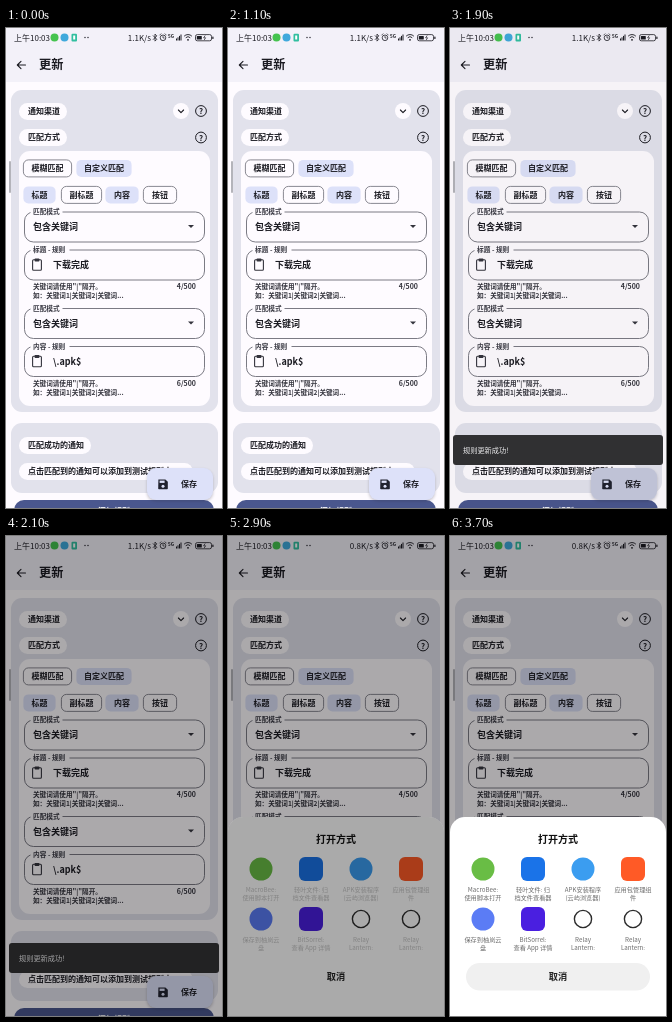
Recreate the animation shown at these times as an HTML page. Size 216x480 px, loop 3800 ms.

```html
<!DOCTYPE html>
<html lang="zh-CN">
<head>
<meta charset="utf-8">
<title>更新</title>
<style>
  html, body { margin: 0; width: 100%; height: 100%; overflow: hidden; background: #fefbff; }
  svg { display: block; width: 100vw; height: 100vh; }
  text { font-family: 'Noto Sans CJK SC', 'Noto Sans CJK', 'Noto Sans', sans-serif; white-space: pre; }
  #snack { transform-box: fill-box; transform-origin: center; }
</style>
</head>
<body>
<svg id="stage" viewBox="0 0 216 480" preserveAspectRatio="none"></svg>
<script>
const INK = '#1b1b22', PAPER = '#fefbff', CARD = '#e2e2ec', TINT = '#dde1f9';
const LOOP = 3800, DIM = 0.33;

const box = (x, y, w, h, r, fill, more = '') =>
  `<rect x="${x}" y="${y}" width="${w}" height="${h}" rx="${r}" fill="${fill}" ${more}/>`;
const dot = (x, y, r, fill, more = '') =>
  `<circle cx="${x}" cy="${y}" r="${r}" fill="${fill}" ${more}/>`;
const line = (d, w = 1, color = INK) =>
  `<path d="${d}" fill="none" stroke="${color}" stroke-width="${w}" stroke-linecap="round" stroke-linejoin="round"/>`;
const label = (x, y, size, str, { fill = INK, weight = 700, anchor = 'start', more = '' } = {}) =>
  `<text x="${x}" y="${y}" font-size="${size}" font-weight="${weight}" fill="${fill}" text-anchor="${anchor}" ${more}>${str}</text>`;
const group = (id, body, more = '') => `<g id="${id}" ${more}>${body}</g>`;

const pill = (y, w, str) => box(13, y, w, 17, 8.5, PAPER) + label(22, y + 11.4, 8, str);

const help = y =>
  dot(195, y, 5.4, 'none', `stroke="${INK}" stroke-width="1"`) +
  label(195, y + 3, 8, '?', { anchor: 'middle' });

function chip(x, y, w, str, on) {
  const border = on ? '' : 'stroke="#6c6c76" stroke-width=".8"';
  return box(x + .4, y + .4, w - .8, 17, 5, on ? TINT : PAPER, border) +
    label(x + w / 2, y + 11.8, 8, str, { anchor: 'middle' });
}

function field(y, name, value, clip) {
  const w = clip ? 39 : 32;
  let s = box(18.5, y + .5, 180, 30, 9, 'none', 'stroke="#6c6c76" stroke-width=".9"') +
    box(24.5, y - 3, w, 7, 0, PAPER) +
    label(27, y + 2.8, 6.7, name, { fill: '#3c3c46' }) +
    label(clip ? 47 : 27, y + 18.6, 9, value);
  if (clip) {
    s += box(26.6, y + 10.2, 8.8, 10.6, 1, 'none', 'stroke="#34343d" stroke-width="1.1"') +
      box(28.6, y + 9, 4.8, 3, .7, '#34343d');
  } else {
    s += `<path d="M182 ${y + 13.6}h6l-3 3z" fill="#34343d"/>`;
  }
  return s;
}

const hint = (y, count) => {
  const gray = { fill: '#33333c' };
  return label(27, y, 6.6, '关键词请使用"|"隔开。', gray) +
    label(27, y + 9, 6.6, '如：关键词1|关键词2|关键词...', gray) +
    label(190, y, 7, count, { ...gray, anchor: 'end' });
};

const statusBar = () => {
  const wave = r => `M${182 - r} ${11.5 - r}a${r * 1.4} ${r * 1.4} 0 0 1 ${2 * r} 0`;
  const bars = [2, 3.2, 4.6, 6].map((h, i) => box(170 + i * 1.5, 12.5 - h, 1, h, 0, INK)).join('');
  return label(8, 12.6, 8, '上午10:03', { weight: 500 }) +
    dot(48.5, 9.5, 4, '#45c34f') + dot(58.5, 9.5, 4, '#3fa9dc') +
    box(65.5, 5.8, 5.5, 7.6, 1, '#32bfa0') + box(67.2, 7.5, 2, 4, 0, '#fff') +
    dot(79, 9.5, .7, INK) + dot(82, 9.5, .7, INK) +
    group('fast', label(145, 12.6, 8, '1.1K/s', { weight: 500, anchor: 'end' })) +
    group('slow', label(145, 12.6, 8, '0.8K/s', { weight: 500, anchor: 'end' })) +
    line('M147.2 7.7l3.6 3.6-1.8 1.8v-7l1.8 1.8-3.6 3.6', .8) +
    dot(157, 9.8, 2.8, 'none', `stroke="${INK}" stroke-width=".8"`) +
    line('M157 8.3v1.7h1.2M153.8 7l1.2-1.2M160.2 7l-1.2-1.2', .7) +
    label(162, 9.8, 4.6, '5G') + bars +
    line(wave(3.6), .9) + line(wave(2), .9) + dot(182, 11.8, .9, INK) +
    box(189.5, 6.6, 16, 6.2, 1.8, 'none', `stroke="${INK}" stroke-width=".8"`) +
    box(190.8, 7.9, 5, 3.6, .6, INK) +
    box(206.3, 8.5, 1.2, 2.4, .5, INK) + line('M199 7.8l-1.4 2h2l-1.2 1.9', .7);
};

const page = () =>
  box(0, 0, 216, 480, 0, PAPER) + box(0, 0, 216, 54, 0, '#f3f1f9') + statusBar() +
  line('M19.5 37h-8M15 33.3l-3.7 3.7 3.7 3.7', 1.1) + label(33, 41.3, 12.2, '更新') +
  box(5, 62, 207, 322, 11, CARD) +
  pill(75, 48, '通知渠道') + dot(175, 83, 8, PAPER) + line('M172.4 82l2.6 2.6 2.6-2.6', 1.1) + help(83) +
  pill(101, 48, '匹配方式') + help(109.5) +
  box(13, 123, 191, 255, 11, PAPER) +
  chip(17, 131.5, 49, '模糊匹配') + chip(70, 131.5, 56, '自定义匹配', true) +
  chip(17, 158, 33, '标题', true) + chip(55, 158, 41, '副标题') +
  chip(99, 158, 34, '内容', true) + chip(137, 158, 34, '按钮') +
  field(183.5, '匹配模式', '包含关键词') +
  field(221.5, '标题 - 规则', '下载完成', true) + hint(261, '4/500') +
  field(280, '匹配模式', '包含关键词') +
  field(318, '内容 - 规则', '\\.apk$', true) + hint(358, '6/500') +
  box(3, 133, 2, 32, 1, '#b4b4ba') +
  box(5, 395, 207, 70, 11, CARD) +
  pill(409, 72, '匹配成功的通知') + pill(435, 174, '点击匹配到的通知可以添加到测试规则中') +
  box(8, 472, 200, 30, 10, '#4a578e') + label(108, 486, 8, '添加规则', { fill: '#fff', anchor: 'middle' });

const saveButton = () =>
  box(141, 441.5, 66, 32, 9, '#34344a', 'opacity=".28" filter="url(#soft)"') +
  box(141, 440, 66, 32, 9, TINT) +
  `<g clip-path="url(#fab)">${dot(174, 456, 36, '#55555c', 'id="ripple"')}</g>` +
  '<path d="M152.4 451.4h7l2.4 2.4v6.6q0 .8-.8.8h-8q-.8 0-.8-.8z" fill="#20222f"/>' +
  box(153.6, 452.6, 5, 2.3, 0, TINT) + dot(157, 458.2, 1.5, TINT) +
  label(175, 459, 8, '保存');

const snackbar = () =>
  box(3, 407, 210, 30, 3, '#323234') + label(13, 424.6, 7.2, '规则更新成功!', { fill: '#f4f4f6', weight: 500 });

const apps = [
  ['#69bd45', 'dot', 'MacroBee:', '使用脚本打开'],
  ['#1a73e8', 'box', '轻叶文件: 归', '档文件查看器'],
  ['#3b9df0', 'dot', 'APK安装程序', '(云屿浏览器)'],
  ['#ff5a26', 'box', '应用包管理组', '件'],
  ['#5b7cf5', 'dot', '保存到柚岚云', '盘'],
  ['#4a1fe0', 'box', 'BitSorrel:', '查看 App 详情'],
  ['', 'ring', 'Relay', 'Lantern:'],
  ['', 'ring', 'Relay', 'Lantern:']
];

function appIcon([color, kind], i) {
  const x = 33 + i % 4 * 50, y = i < 4 ? 333 : 383;
  if (kind === 'box') return box(x - 12, y - 12, 24, 24, 6, color);
  if (kind === 'dot') return dot(x, y, 11.5, color);
  return dot(x, y, 8.6, '#fff', 'stroke="#2c2c2c" stroke-width="1.4"');
}

function appName([, , top, low], i) {
  const x = 33 + i % 4 * 50, y = i < 4 ? 356 : 406;
  const style = { anchor: 'middle', weight: 400, fill: '#6a6a6a' };
  return label(x, y, 6.2, top, style) + label(x, y + 7.6, 6.2, low, style);
}

const sheet = () =>
  box(0, 281, 216, 220, 15, '#fff') +
  label(108, 306.6, 10, '打开方式', { anchor: 'middle', fill: '#111' }) +
  apps.map(appIcon).join('') +
  group('names', apps.map(appName).join('')) +
  box(16, 427, 184, 27.5, 13.7, '#f0f0f0', 'id="cancel"') +
  label(108, 444.2, 9.2, '取消', { anchor: 'middle', fill: '#222' }) +
  box(0, 281, 216, 220, 15, '#000', 'id="shade"');

const stage = document.getElementById('stage');
stage.innerHTML =
  '<defs><filter id="soft" x="-20%" y="-30%" width="140%" height="170%"><feGaussianBlur stdDeviation="1.8"/></filter>' +
  `<clipPath id="fab">${box(141, 440, 66, 32, 9, '#000')}</clipPath></defs>` +
  page() + saveButton() + group('snack', snackbar()) +
  box(0, 0, 216, 480, 0, '#000', 'id="dim"') + group('sheet', sheet());

// Each track: [ms, value, easing]; a repeated time is a hard cut.
function track(id, prop, steps) {
  const frames = steps.map(([ms, value, easing = 'linear']) => ({ offset: ms / LOOP, [prop]: value, easing }));
  document.getElementById(id).animate(frames, { duration: LOOP, iterations: Infinity });
}
const cut = (id, at, before, after) =>
  track(id, 'opacity', [[0, before], [at, before], [at, after], [LOOP, after]]);

cut('fast', 2500, 1, 0);
cut('slow', 2500, 0, 1);
cut('names', 3000, 0.4, 1);
cut('cancel', 3000, 0, 1);
cut('shade', 3000, DIM, 0);
track('ripple', 'opacity', [[0, 0], [1640, 0], [1780, 0.18], [1920, 0.18], [2100, 0], [LOOP, 0]]);
track('snack', 'opacity', [[0, 0], [1740, 0], [1860, 1], [LOOP, 1]]);
track('snack', 'transform', [[0, 'scale(.8)'], [1740, 'scale(.8)', 'ease-out'], [1890, 'scale(1)'], [LOOP, 'scale(1)']]);
track('dim', 'opacity', [[0, 0], [1880, 0], [2100, DIM], [LOOP, DIM]]);
track('sheet', 'transform', [
  [0, 'translateY(205px)'], [2400, 'translateY(205px)', 'cubic-bezier(.2,.7,.2,1)'],
  [2820, 'translateY(0px)'], [LOOP, 'translateY(0px)']
]);
</script>
</body>
</html>
```
